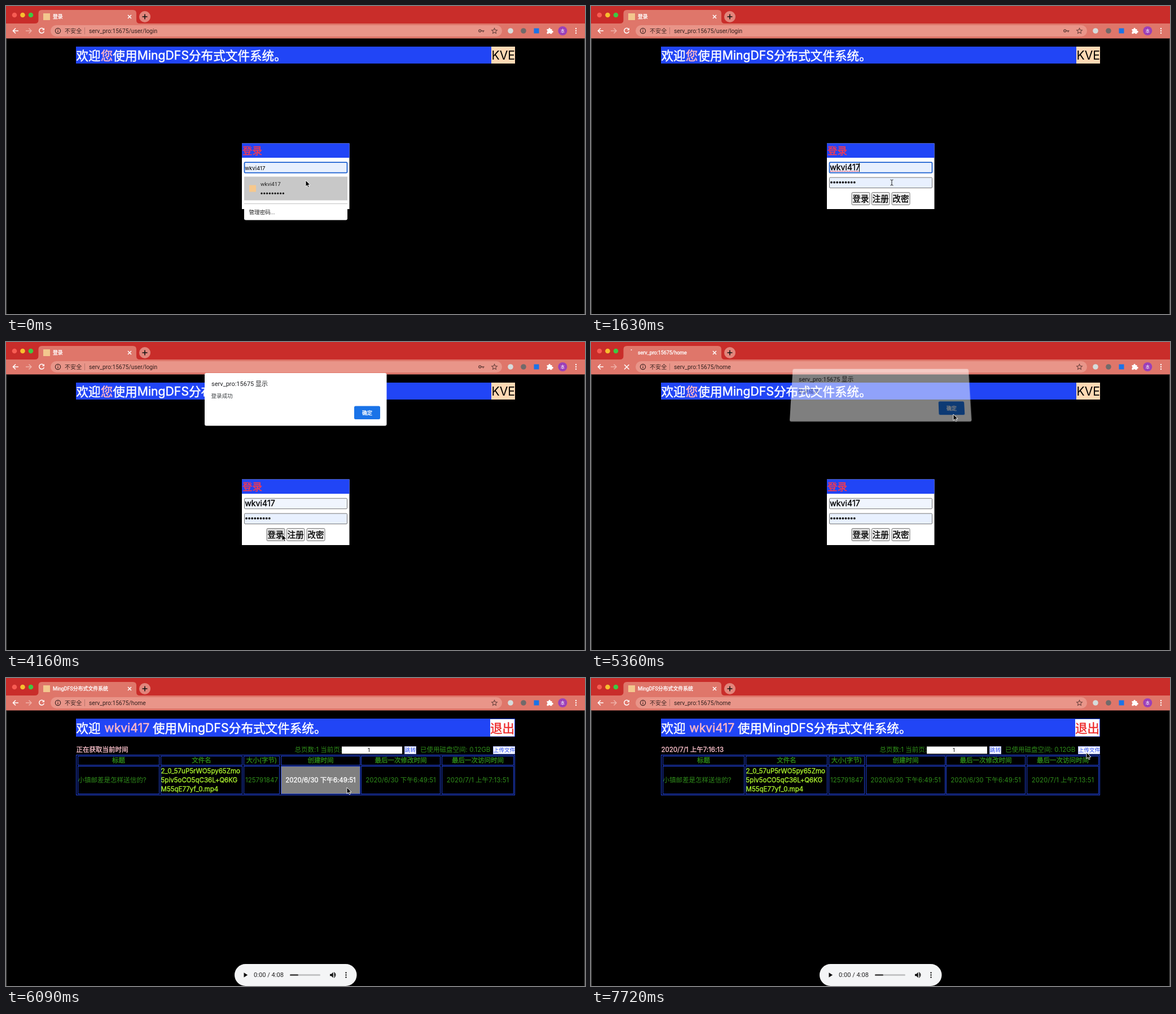
Animation of 1026x546 px, one loop 8000 ms. Source, as an HTML page:

```html
<!DOCTYPE html>
<html lang="zh-CN">
<head>
<meta charset="utf-8">
<style>
html, body { margin: 0; width: 100%; height: 100%; overflow: hidden; background: #000; }
svg { position: absolute; left: 0; top: 0; display: block; }
text { font-family: Inter, "Noto Sans CJK SC", "Noto Sans CJK", sans-serif; font-feature-settings: "calt" 0; white-space: pre; }
.ui text, text.ui { font-family: Roboto, "Noto Sans CJK SC", "Noto Sans CJK", sans-serif; }
#dialog { left: 352px; top: 55px; transform-origin: 50% 100%; overflow: visible; }
</style>
</head>
<body>
<svg id="stage" width="1026" height="546"></svg>
<svg id="dialog" class="ui" width="322" height="93"></svg>
<svg id="pointer" width="1026" height="546"></svg>
<script>
const LOOP = 8000, STEP = 148.5;
const BLUE = '#2145f6', EDGE = '#2042dc', GREEN = '#2f8c1a', PINK = '#ffb8c6';
const BAR = '#df766a', PEACH = '#ffd9b4', ICON = '#6f4540';
const USER = 'wkvi417';
const $ = id => document.getElementById(id);

const rect = (x, y, w, h, fill, more = '') =>
  `<rect x="${x}" y="${y}" width="${w}" height="${h}" fill="${fill}" ${more}/>`;
const circle = (x, y, r, fill, more = '') =>
  `<circle cx="${x}" cy="${y}" r="${r}" fill="${fill}" ${more}/>`;
const text = (x, y, size, fill, str, more = '') =>
  `<text x="${x}" y="${y}" font-size="${size}" fill="${fill}" ${more}>${str}</text>`;
// medium weight: a thin outline in the text colour
const medium = (x, y, size, fill, str, more = '') =>
  text(x, y, size, fill, str, `stroke="${fill}" stroke-width="${(size * .012 + .2).toFixed(2)}" ${more}`);
const line = (d, stroke, width = 1, more = '') =>
  `<path d="${d}" fill="none" stroke="${stroke}" stroke-width="${width}" ${more}/>`;
const group = (id, ...parts) => `<g id="${id}">${parts.join('')}</g>`;
const dots = (x, y, gap, r, n, fill = '#111') =>
  Array.from({ length: n }, (_, i) => circle(x + i * gap, y, r, fill)).join('');
const column = (x, y) => [-4, 0, 4].map(d => circle(x, y + d, 1.2, 'currentColor')).join('');
const MID = 'text-anchor="middle"';

function chrome() {
  return `<g class="ui">` + [
    rect(0, 0, 1026, 31, '#c92d2a'),
    `<path d="M51 31Q57.500 31 57.500 25V13Q57.500 7 63.500 7H225Q231 7 231 13V25Q231 31 237 31Z" fill="${BAR}"/>`,
    rect(0, 31, 1026, 26.5, BAR),
    circle(15, 16, 4.3, '#f75c53'), circle(29.5, 16, 4.3, '#f7be2f'), circle(44, 16, 4.3, '#3ec842'),
    line('M216 16l6 6M222 16l-6 6', '#fff', 1.5),
    circle(246, 19, 10, '#e2857b'), line('M241.500 19h9M246 14.500v9', '#111', 1.6),
    line('M22 44H13M17 39.500L12.500 44L17 48.500', '#fff', 1.6),
    line('M35 44H44M40.500 39.500L45 44L40.500 48.500', '#efb2a9', 1.5),
    rect(79, 34, 800, 20, '#e99589', 'rx="10"'),
    circle(92, 44, 4.6, 'none', 'stroke="#3f2522" stroke-width="1.2"'),
    line('M92 43.500v3M92 41v1.200', '#3f2522', 1.3),
    text(104, 47.7, 10.1, '#3f2522', '不安全'),
    line('M139.500 38V50', '#b9746b'),
    line('M865.500 39.300l1.400 3.100 3.400.400-2.500 2.300.700 3.300-3-1.700-3 1.700.700-3.300-2.500-2.300 3.400-.400z', ICON, 1.1),
    circle(894, 44, 4.8, '#d5dcdc'),
    circle(917, 44, 4.8, '#716a6a'),
    rect(935.5, 39.5, 9, 9, '#1a73e8'),
    `<path d="M958.500 41h3a1.700 1.700 0 1 1 3.200 0h2.800v3a1.700 1.700 0 1 1 0 3.200v2h-3.300a1.500 1.500 0 0 0-2.900 0h-2.800v-2.900a1.600 1.600 0 0 0 0-3z" fill="#fff"/>`,
    circle(986.3, 44, 8, '#9c40b8'), text(986.3, 46.8, 7.5, '#fff', '本', MID),
    `<g color="#fff">${column(1010, 44)}</g>`,
    group('reload', line('M66.700 41A4.400 4.400 0 1 0 67.400 45', '#fff', 1.5), '<path d="M68 38.800v4.200h-4.200z" fill="#fff"/>'),
    group('stop', line('M59.500 40.500l7.500 7.500M67 40.500l-7.500 7.500', '#fff', 1.5, 'stroke-linecap="round"')),
    group('key', circle(839.8, 44, 2, 'none', `stroke="${ICON}" stroke-width="1.500"`), line('M842 44h5.500M845.500 44v2.500', ICON, 1.5)),
    group('favicon', rect(66, 13, 12, 12, '#f3c78e')),
    group('spinner', circle(71.5, 14, .9, '#fff')),
    medium(83, 22, 8.9, '#fff', '', 'id="title"'),
    text(147, 47.7, 10.3, '#33201e', '', 'id="url"')
  ].join('') + '</g>';
}

function login() {
  const box = (y, id = '') => rect(422.5, y, 182, 18.5, '#e8f0fe', `rx="1.500" stroke="#767676" ${id}`);
  const button = (x, w, label, id = '') =>
    rect(x, 330.5, w, 22, '#efefef', `rx="2" stroke="#767676" ${id}`) + medium(x + w / 2, 346.8, 14.4, '#000', label, MID);
  return group('login',
    rect(124, 72, 778, 30, BLUE),
    medium(124.5, 95.6, 21.6, '#fff', '欢迎'),
    medium(167.7, 95.6, 21.6, PINK, '您'),
    medium(189.3, 95.6, 21.6, '#fff', '使用'),
    medium(232.8, 95.2, 21.2, '#fff', 'MingDFS'),
    medium(324, 95.6, 21.6, '#fff', '分布式文件系统。'),
    rect(860, 72, 42, 30, PEACH), text(881.2, 95.2, 21.2, '#000', 'KVE', MID),
    rect(418, 243.5, 190.5, 116.5, '#fff'),
    rect(418, 243.5, 190.5, 25.5, BLUE),
    medium(419, 263, 17.5, '#fb3a4c', '登录'),
    box(277.2, 'id="field"'), box(304),
    group('filled',
      medium(423.2, 291, 14.2, '#000', USER), dots(426, 312.7, 5.1, 1.9, 9),
      button(462, 32, '登录', 'id="submit"'), button(497.5, 31.5, '注册'), button(533, 32, '改密')),
    line('M424 293H476', '#f0354a', 1.3, 'id="spell" stroke-dasharray="1.500 1.500"'),
    group('menu',
      text(423.2, 290.8, 9.6, '#000', USER),
      rect(422, 302.5, 183, 77, '#fff', 'rx="3"'),
      rect(422, 302.5, 183, 42, '#c8c8c8'),
      line('M422 350.500H605', '#c4c4c4'),
      rect(431, 317.5, 12, 12, '#f6c88d'),
      text(451, 319, 9.7, '#222', USER, 'class="ui"'),
      dots(453, 332.2, 4.8, 1.6, 9),
      text(430.5, 369, 9.6, '#222', '管理密码...', 'class="ui"')),
    rect(475, 278.5, 1, 15.5, '#000', 'id="caret"'));
}

const COLS = [[127, 145], [274, 145], [421, 64], [487, 141], [629, 141], [772, 128]];
const HEADS = ['标题', '文件名', '大小(字节)', '创建时间', '最后一次修改时间', '最后一次访问时间'];
const CELLS = ['小镇邮差是怎样送信的?', '', '125791847', '2020/6/30 下午6:49:51', '2020/6/30 下午6:49:51', '2020/7/1 上午7:13:51'];
const FILE = ['2_0_57uP5rWO5py65Zmo', '5piv5oCO5qC36L+Q6KG', 'M55qE77yf_0.mp4'];

function home() {
  const S = 11.52, edge = `stroke="${EDGE}"`;
  const button = (x, w, label) =>
    rect(x + .5, 121.5, w - 1, 13, '#fff', 'stroke="#a9b6ff"') + text(x + .8, 131.3, 9.6, BLUE, label);
  const table = COLS.map(([x, w], i) => {
    const mid = x + w / 2;
    const body = i == 1
      ? FILE.map((s, k) => medium(274.5, 169.3 + k * 15.8, S, '#adf52f', s)).join('')
      : i ? text(mid, 185.3, S, GREEN, CELLS[i], MID) : text(127.5, 185.3, S, GREEN, CELLS[i]);
    return rect(x + .5, 138.5, w - 1, 16, 'none', edge) + medium(mid, 150.3, S, GREEN, HEADS[i], MID)
      + `<g class="cell">${rect(x + .5, 156.5, w - 1, 49, 'none', edge)}${body}</g>`;
  }).join('');
  return group('home',
    rect(124, 72, 778, 32, BLUE),
    medium(124.5, 96.6, 21.6, '#fff', '欢迎'),
    medium(174.3, 96.2, 21.2, PINK, USER),
    medium(260, 96.6, 21.6, '#fff', '使用'),
    medium(303.3, 96.2, 21.2, '#fff', 'MingDFS'),
    medium(394.8, 96.6, 21.6, '#fff', '分布式文件系统。'),
    rect(858, 73, 43, 30.5, '#fff'), medium(858, 97, 21.6, '#ee2a2a', '退出'),
    medium(124.5, 131.2, 11.5, '#ffc4ce', '', 'id="clock"'),
    text(511.5, 131.2, S, GREEN, '总页数:1 当前页:'),
    rect(595, 121.5, 107, 12.8, '#fff'), text(643, 131.4, 9.6, '#000', '1', MID),
    button(706, 21, '跳转'),
    text(734, 131.2, S, GREEN, '已使用磁盘空间: 0.12GB'),
    button(863, 39, '上传文件'),
    rect(124.5, 136.5, 777, 71, 'none', edge), table,
    rect(405, 507, 216.5, 39, '#f4f5f6', 'rx="19.500"'),
    '<path d="M421.500 522.300v8.400l6.700-4.200zM574 524.800h2.500l3.200-3.200v9.800l-3.200-3.200h-2.500z" fill="#111"/>',
    line('M581.200 524.200q2 2.300 0 4.600M581.200 521.800q5.400 4.700 0 9.400', '#111', 1.2),
    text(439, 530.3, 11.1, '#222', '0:00 / 4:08', 'class="ui"'),
    rect(503, 525, 54, 3, '#c3c4c5', 'rx="1.500"'), rect(503, 525, 15, 3, '#555', 'rx="1.500"'),
    `<g color="#111">${column(602.5, 526.5)}</g>`);
}

$('stage').innerHTML = rect(0, 0, 1026, 546, '#000') + chrome() + login() + home()
  + line('M.500 57V546M1025.500 57V546', '#5c5c5c');
$('dialog').innerHTML = rect(0, 0, 322.5, 93.5, '#fff', 'rx="3"')
  + text(12, 22.7, 11, '#202124', 'serv_pro:15675 显示')
  + text(11.5, 43.6, 9.6, '#3c4043', '登录成功')
  + rect(265, 58.5, 46, 23.5, '#1a73e8', 'rx="2.500"')
  + medium(288, 73.6, 9, '#fff', '确定', MID);
$('pointer').innerHTML =
  group('arrow', '<path d="M0 0V11.200L2.600 8.800L4.400 12.600L6.200 11.800L4.500 8.100H8Z" fill="#000" stroke="#fff" stroke-width=".900"/>')
  + group('beam', line('M-2.500 -5Q0 -5 0 -3.500Q0 -5 2.500 -5M0 -3.500V4M-2.500 5Q0 5 0 3.500Q0 5 2.500 5', '#222', 1));

// time, x, y of the pointer tip
const PATH = [
  [0, 531, 309], [290, 532, 311], [600, 532, 311], [1330, 533, 313], [1800, 533, 313],
  [2370, 494, 338], [2800, 489, 341], [4310, 489, 341], [5040, 642, 128], [5350, 642, 128],
  [5930, 604, 194], [6240, 604, 194], [6530, 630, 207], [6830, 716, 211], [7130, 806, 178],
  [7420, 864, 138], [7570, 877, 131], [7710, 878, 132]
];
const CARET_ON = [[1630, 2070], [2670, 3120], [3720, 4160]];

function pointerAt(t) {
  const i = PATH.findIndex(p => p[0] > t);
  if (i < 0) return PATH[PATH.length - 1].slice(1);
  const [t0, x0, y0] = PATH[i - 1], [t1, x1, y1] = PATH[i], k = (t - t0) / (t1 - t0);
  return [x0 + (x1 - x0) * k, y0 + (y1 - y0) * k];
}

const within = (t, a, b) => t >= a && t < b;
const show = (id, on) => { $(id).style.display = on ? '' : 'none'; };
const attrs = (el, o) => { for (const k in o) el.setAttribute(k, o[k]); };
const put = (id, s) => { if ($(id).textContent != s) $(id).textContent = s; };
const cells = [...document.querySelectorAll('.cell')];

function draw(t) {
  const [x, y] = pointerAt(Math.floor((t + 10) / STEP) * STEP);
  const isHome = t >= 5650, leaving = t >= 5360, menu = t < 1630, focus = t < 4160;

  show('login', !isHome);
  show('home', isHome);
  show('menu', menu);
  show('filled', !menu);
  show('spell', !menu && focus);
  show('caret', CARET_ON.some(([a, b]) => within(t, a, b)));
  attrs($('field'), focus
    ? { stroke: '#1a5fd0', 'stroke-width': 1.8, fill: '#e8f0fe' }
    : { stroke: '#767676', 'stroke-width': 1, fill: '#f0f5fe' });
  attrs($('submit'), { fill: t >= 2520 ? '#dedede' : '#efefef' });

  show('key', !leaving);
  show('reload', !leaving || isHome);
  show('stop', leaving && !isHome);
  show('favicon', !leaving || isHome);
  show('spinner', leaving && !isHome);
  put('title', isHome ? 'MingDFS分布式文件系统' : leaving ? 'serv_pro:15675/home' : '登录');
  put('url', 'serv_pro:15675/' + (leaving ? 'home' : 'user/login'));
  put('clock', t < 6530 ? '正在获取当前时间' : '2020/7/1 上午7:16:' + (t < 7570 ? 12 : 13));

  const tilted = within(t, 4020, 4160) || leaving;
  show('dialog', within(t, 4020, 5510));
  $('dialog').style.opacity = tilted ? .5 : 1;
  $('dialog').style.transform = tilted ? 'translateY(-7.5px) perspective(140px) rotateX(3deg) scaleY(1.035)' : 'none';

  cells.forEach((cell, i) => {
    const [cx, w] = COLS[i], over = isHome && within(x, cx, cx + w) && within(y, 156, 206);
    cell.firstChild.setAttribute('fill', over ? '#808080' : 'none');
    for (const el of cell.querySelectorAll('text')) {
      el.style.fill = el.style.stroke = over ? '#fff' : '';
      el.style.strokeWidth = over ? .35 : '';
    }
  });

  const beam = within(t, 1630, 2070);
  show('beam', beam);
  show('arrow', !beam);
  attrs($(beam ? 'beam' : 'arrow'), { transform: `translate(${x} ${y})` });
}

const start = performance.now();
(function tick() {
  draw((performance.now() - start) % LOOP);
  requestAnimationFrame(tick);
})();
</script>
</body>
</html>
```
